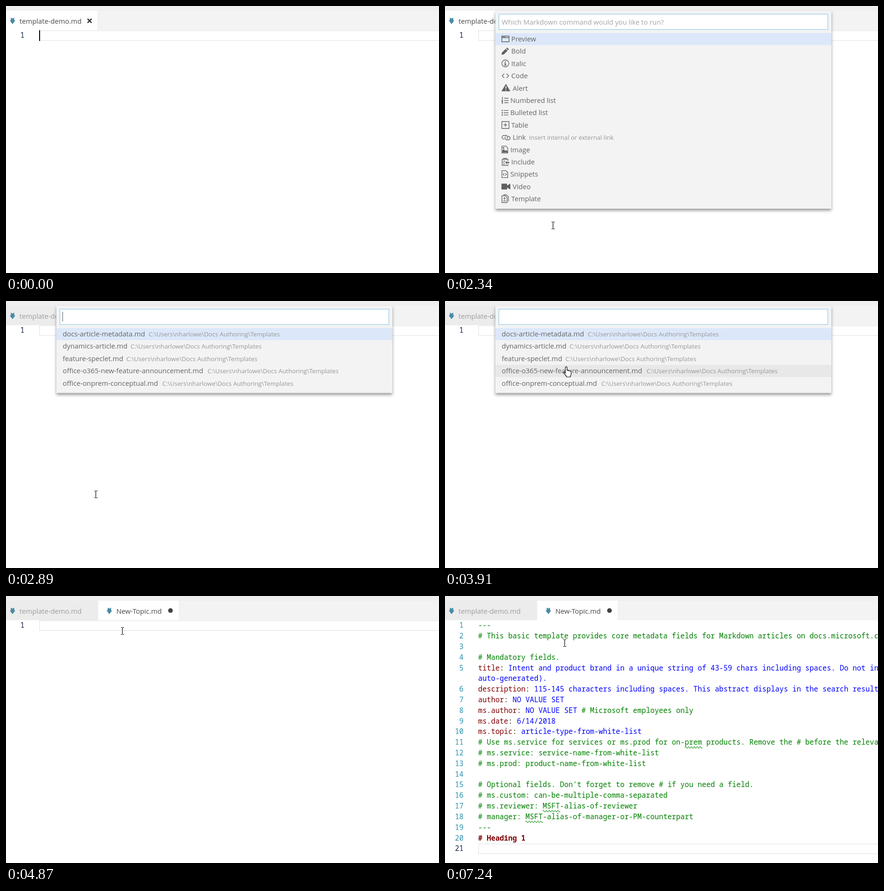
An HTML page for the animation above (7320 ms loop, 928 by 573 pixels).

```html
<!DOCTYPE html>
<html lang="en">
<head>
<meta charset="utf-8">
<title>Template picker</title>
<style>
  html, body { margin: 0; width: 100%; height: 100%; overflow: hidden; background: #fff; }
  svg { display: block; width: 928px; height: 573px; overflow: hidden; }
  text { white-space: pre; font: 14.75px "Open Sans", "Noto Sans", sans-serif; }
  .code { font: 15.39px "Noto Sans Mono", "DejaVu Sans Mono", monospace; }
  .bold { font-weight: 700; }
  .num { fill: #2b91af; text-anchor: end; }
  .now { fill: #10204a; }
  .label { fill: #646464; }
  .desc { fill: #979797; font-size: 13.15px; }
  .line { fill: none; stroke: #eee; stroke-width: 2; }
  .icon { fill: none; stroke: #616161; stroke-width: 1.4; }
  .solid { fill: #616161; }
  .panel { fill: #f3f3f3; filter: drop-shadow(0 4px 3px #999); }
  .wave { fill: none; stroke: #2f9a2f; stroke-width: 1.2; }
</style>
</head>
<body>
<svg id="stage" viewBox="0 0 928 573"></svg>
<script>
const LOOP = 7320, ROW = 26.4, TOP = 58, PITCH = 22.81, CHAR = 9.235;

// label, label x, stroked icon, filled icon, description, description x
const page = 'M1-7.5H9.5L13.5-3.5V7.5H1Z';
const commands = [
  ['Preview', 142, 'M.7-6H16.3V6.3H.7ZM.7-2.7H16.3', 'M2-5h1.5v1.4H2ZM4.5-5H6v1.4H4.5ZM7-5h1.5v1.4H7Z'],
  ['Bold', 142, '', 'M0 7.5L1 3 9-5 13-1 5 7ZM10-6L12-8 16-4 14-2Z'],
  ['Italic', 142, 'M.8 0a7.5 7.5 0 1 0 15 0a7.5 7.5 0 1 0-15 0', 'M7.2-4.5h2.2v2.2H7.2ZM6-1H9.4V3.3H10.8V4.6H6V3.3H7.2V.3H6Z'],
  ['Code', 142, 'M6-4.5L1.5 0 6 4.5M11-4.5L15.5 0 11 4.5', ''],
  ['Alert', 145, '', 'M9.5-9L19 7H0ZM8.4-4L8.8 2H10.2L10.6-4ZM8.5 3.5v2h2v-2Z'],
  ['Numbered list', 140, 'M6-4.5H15M6 .3H15M6 5H15M1-5.5L2.2-6.2V-2.5M.5-.8H2.5L1 2H3M.5 3.8H2.5V6.4H.5', ''],
  ['Bulleted list', 140, 'M5-4.5H15M5 .3H15M5 5H15', 'M.5-5.8H3v2.5H.5ZM.5-1H3v2.5H.5ZM.5 3.8H3v2.5H.5Z'],
  ['Table', 142, 'M.8-7.3H16.2V7.5H.8ZM4.5 0H12.5M8.5-4V4', ''],
  ['Link', 145, 'M6 4H5a3.8 4 0 0 1 0-8H9.5a3.8 4 0 0 1 2 7.2M14 -2H15a3.5 3.8 0 0 1 0 7.6H11a3.7 4 0 0 1-2.5-6.8', '', 'Insert internal or external link', 180],
  ['Image', 140, page, 'M2 6.5V2L5-1 8 3 10 1 13 4V6.5ZM3-5H6v3H3Z'],
  ['Include', 142, 'M14-2V-5.5H1.5V7.5H14V5M4.5-5V-7.5H11V-5M4-1.5H8M4 1.5H6M4 4.5H7', 'M8 1.5L12-2V.3H17V2.7H12V5Z'],
  ['Snippets', 140, page + 'M6-2L3.8.5 6 3M8.5-2L10.7.5 8.5 3', ''],
  ['Video', 145, '', 'M0-6H12V-2L19-6V6.5L12 2.5V6.5H0Z'],
  ['Template', 142, 'M1-6.5H8L12-3V8H1ZM4-8.5H10.5L15-4.5V6M6.5-3.5V2M3.8-.8H9.2M3.8 4.5H9.2', ''],
];
const folder = 'C:\\Users\\nharlowe\\Docs Authoring\\Templates';
const files = [
  ['docs-article-metadata.md', 306], ['dynamics-article.md', 267], ['feature-speclet.md', 258],
  ['office-o365-new-feature-announcement.md', 432], ['office-onprem-conceptual.md', 335],
].map(([name, x]) => [name, 121.5, '', '', folder, x]);

const source = `---
# This basic template provides core metadata fields for Markdown articles on docs.microsoft.com.

# Mandatory fields.
title: Intent and product brand in a unique string of 43-59 chars including spaces. Do not include
auto-generated).
description: 115-145 characters including spaces. This abstract displays in the search results.
author: NO VALUE SET
ms.author: NO VALUE SET # Microsoft employees only
ms.date: 6/14/2018
ms.topic: article-type-from-white-list
# Use ms.service for services or ms.prod for on-prem products. Remove the # before the relevant
# ms.service: service-name-from-white-list
# ms.prod: product-name-from-white-list

# Optional fields. Don't forget to remove # if you need a field.
# ms.custom: can-be-multiple-comma-separated
# ms.reviewer: MSFT-alias-of-reviewer
# manager: MSFT-alias-of-manager-or-PM-counterpart
---
# Heading 1
`.split('\n');

// Pointer stops: time, x, y
const stops = [
  [2000, 316, 565], [2320, 231, 471], [2560, 196, 424], [2640, 192, 415],
  [3119, 192, 415], [3120, 200, 420], [3200, 207, 424], [3419, 207, 424],
  [3420, 209, 415], [3660, 240, 285], [3820, 259, 180], [3900, 260, 141],
  [3980, 257, 118], [4130, 247, 83], [4209, 247, 83], [4210, 247, 78],
  [4379, 247, 78], [4380, 248, 77], [4470, 249, 75], [5419, 249, 75],
  [5420, 249, 79], [5510, 249, 83], [7239, 249, 83], [7240, 256, 101], [LOOP, 256, 101],
];

const text = (x, y, s, cls = '', fill = '') =>
  `<text x="${x}" y="${y}" class="${cls}"${fill && ` fill="${fill}"`}>${s}</text>`;
const rect = (x, y, w, h, fill, more = '') =>
  `<rect x="${x}" y="${y}" width="${w}" height="${h}" fill="${fill}" ${more}/>`;
const group = (id, body) => `<g id="${id}">${body}</g>`;

const arrow = x => `<path transform="translate(${x} 0)" fill="#478aa6"
  d="M-3.7 25L0 27 3.7 25V31H6L0 39-6 31H-3.7Z"/>`;
const lineBox = row => rect(72, 53 + Math.round(row * PITCH), 900, 21, 'none', 'class="line"');

function picker(id, rows, hint) {
  const items = rows.map(([label, x, lines, solid, desc, dx], i) => {
    const mid = TOP + ROW * i + 12.5, base = mid + 5.5;
    return `<g transform="translate(121 ${mid})"><path class="icon" d="${lines}"/>
      <path class="solid" fill-rule="evenodd" d="${solid}"/></g>`
      + text(x, base, label, 'label') + (desc ? text(dx, base, desc, 'desc') : '');
  });
  return group(id,
    rect(108, 10, 720, TOP + ROW * rows.length - 2.6, '', 'class="panel"')
    + rect(115.5, 17.5, 705, 33, '#fff', 'stroke="#84c3e8"')
    + text(121.5, 40, hint, '', '#a3a3a3')
    + rect(108, TOP, 720, 26, '#dce8fa')
    + rect(108, 0, 720, 26, '#e8e8e8', 'class="hover"')
    + items.join(''));
}

function colored(line) {
  const span = (s, c) => `<tspan fill="${c}">${s}</tspan>`;
  if (/^[#-]/.test(line)) return span(line, line.includes('Heading') ? '#800000' : '#008000');
  const [, key, value, note] = line.match(/^([\w.]+(?=: ))?(.*?)(#.*)?$/);
  return key
    ? span(key, '#800000') + span(':', '#222') + span(value.slice(1), '#0000ff') + span(note || '', '#008000')
    : span(line, '#0000ff');
}

function documentBody() {
  let n = 0;
  return lineBox(21) + source.map((line, row) => {
    const y = 68.3 + row * PITCH, wrapped = line.startsWith('auto');
    const number = wrapped ? '' : text(39.7, y, ++n, 'code num' + (n === 21 ? ' now' : ''));
    return number + text(71, y, colored(line), line.includes('Heading') ? 'code bold' : 'code');
  }).join('');
}

function wave(row, col) {
  const y = 325 + (row - 11) * PITCH;
  return `<path class="wave" d="M${71 + col * CHAR} ${y}${'q1.55-3.6 3.1 0t3.1 0'.repeat(6)}"/>`;
}

const stage = document.getElementById('stage');
stage.innerHTML =
  rect(0, 0, 928, 10, '#efefef') + rect(0, 10, 928, 42, '#f3f3f3')
  + group('oneTab', rect(0, 10, 196, 42, '#fff') + text(29, 38, 'template-demo.md', '', '#484848')
    + '<path d="M174.8 27.5l8.6 8.6m0-8.6l-8.6 8.6" stroke="#383838" stroke-width="2.6"/>')
  + group('twoTabs', rect(0, 10, 197, 42, '#ececec') + rect(198, 10, 172, 42, '#fff')
    + text(29, 38, 'template-demo.md', '', '#9c9c9c') + text(236.5, 38, 'New-Topic.md', '', '#484848')
    + arrow(221.5) + '<circle cx="352.5" cy="31.3" r="5" fill="#424242"/>')
  + arrow(14)
  + group('blank', lineBox(0) + text(39.7, 68.3, 1, 'code num now'))
  + rect(71, 52, 2, 23, '#000', 'id="caret"')
  + group('doc', documentBody())
  + group('waves', wave(11, 48) + wave(17, 15) + wave(18, 11))
  + picker('menu', commands, 'Which Markdown command would you like to run?')
  + picker('list', files, '')
  + rect(121, 23, 1, 21, '#505050', 'id="inputCaret"')
  + group('mouse', `<path id="beam" d="M-3-7.5h2.5M.5-7.5h3M0-7V7M-3 7.5h2.5M.5 7.5h3"
      transform="translate(.5 0)" fill="none" stroke="#000" stroke-width="1.2"/>
    <path id="hand" fill="#fff" stroke="#000" stroke-width="1.2" stroke-linejoin="round"
      d="M-2 14V2a1.8 1.8 0 0 1 3.6 0V8q2-1 3.4.8q2-1 3.2.8q2.3-.4 2.3 2V15q0 3-1.8 5V22H0V20L-5.5 13.5q-1-2 .6-2.4q1.2-.2 2.9 2.9Z"/>`);

const $ = id => document.getElementById(id);
const show = (el, on) => { el.style.display = on ? '' : 'none'; };
const within = (t, ...spans) => spans.some(([a, b]) => t >= a && t < b);

// The pointer advances in 80 ms jumps.
function pointer(t) {
  const i = stops.findIndex(s => s[0] > t);
  if (i < 1) return null;
  const [t0, x0, y0] = stops[i - 1], [t1, x1, y1] = stops[i];
  const k = Math.floor((t - t0) / 80) * 80 / (t1 - t0);
  return [Math.round(x0 + (x1 - x0) * k), Math.round(y0 + (y1 - y0) * k)];
}

function draw(t) {
  const menu = within(t, [920, 2740]), list = within(t, [2890, 4870]);
  const filled = t >= 4960;
  show($('oneTab'), t < 2810);
  show($('twoTabs'), t >= 2810);
  show($('blank'), !filled);
  show($('doc'), filled);
  show($('waves'), t >= 5250);
  show($('menu'), menu);
  show($('list'), list);
  $('caret').style.opacity = t < 150 ? 1 : t < 210 ? .5 : within(t, [620, 920]) ? 1 : 0;
  show($('inputCaret'), within(t, [920, 1410], [1710, 2240], [2640, 2740], [2890, 3420], [4000, 4380]));

  const at = pointer(t);
  show($('mouse'), at);
  const rows = menu ? 14 : list ? 5 : 0;
  const row = at ? Math.floor((at[1] - TOP) / ROW) : -1;
  const over = row >= 0 && row < rows;
  for (const el of document.querySelectorAll('.hover')) {
    show(el, over && row > 0);
    el.setAttribute('y', TOP + ROW * row);
  }
  if (!at) return;
  $('mouse').setAttribute('transform', `translate(${at})`);
  show($('hand'), over);
  show($('beam'), !over);
}

const start = performance.now();
function tick() {
  draw((performance.now() - start) % LOOP);
  requestAnimationFrame(tick);
}
tick();
</script>
</body>
</html>
```
